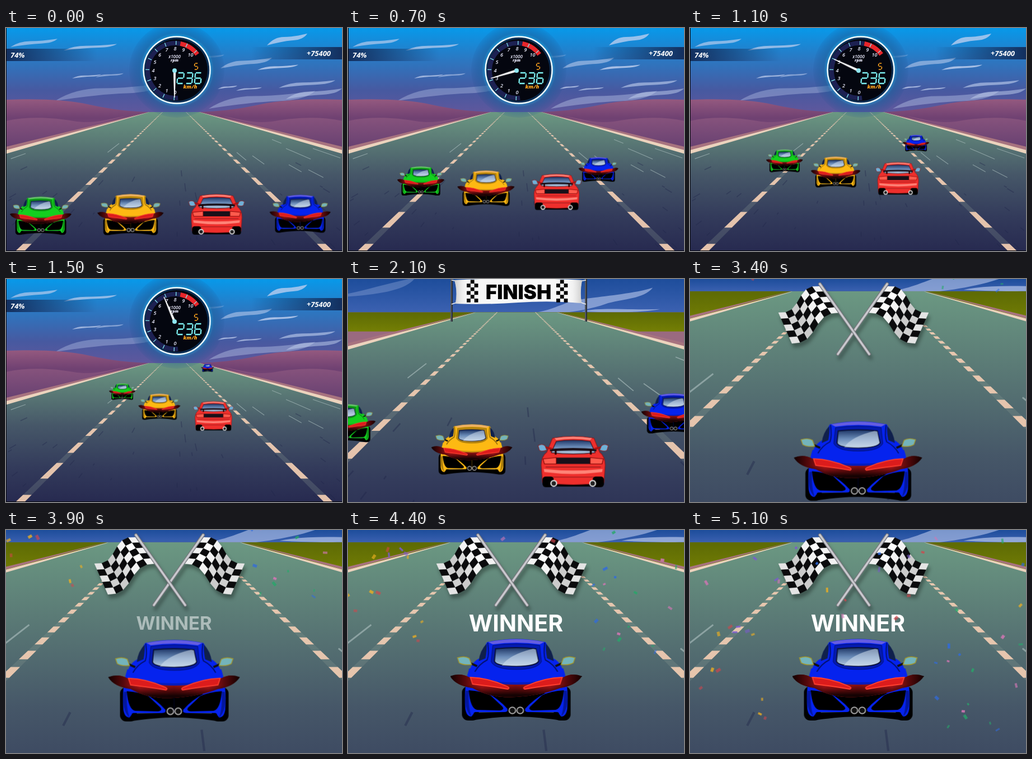
Recreate the animation shown at these times as an HTML page. Size 600x398 px, loop 5.2 s.

```html
<!DOCTYPE html>
<html lang="en">
<head>
<meta charset="utf-8">
<title>Car race</title>
<style>
html, body { margin: 0; width: 100%; height: 100%; overflow: hidden; background: #000; }
svg { display: block; width: 600px; height: 398px; }
.scene, .car, .needle, .bit, .winner, .champ { animation: 5.2s linear infinite; }
.scene { animation-timing-function: step-end; }
#race { animation-name: first; }
#finish { animation-name: second; }
#podium { animation-name: third; }
#race .car { animation-name: race; }
#finish .car { animation-name: sprint; }
.champ { animation-name: arrive; }
.needle { animation-name: rev; }
.bit { animation-name: fall; }
.winner { animation-name: pop; transform-origin: 300px 167px; }
.hud { font: italic 700 13px "Open Sans", sans-serif; fill: #fff; }
.dial { font: italic 600 9px "Open Sans", sans-serif; fill: #eef; text-anchor: middle; }
.green { --c: #13cf1f; } .yellow { --c: #fdb913; } .blue { --c: #0523ee; }

@keyframes first { 0% { visibility: visible } 34.615%, 100% { visibility: hidden } }
@keyframes second { 0% { visibility: hidden } 34.615% { visibility: visible } 59.615%, 100% { visibility: hidden } }
@keyframes third { 0% { visibility: hidden } 59.615%, 100% { visibility: visible } }
@keyframes race {
  0% { transform: var(--p0) } 13.462% { transform: var(--p1) }
  28.846% { transform: var(--p2) } 34.615%, 100% { transform: var(--p3) }
}
@keyframes sprint {
  0%, 34.615% { transform: var(--p0) } 51.923% { transform: var(--p1) } 59.615%, 100% { transform: var(--p2) }
}
@keyframes arrive {
  0%, 59.615% { transform: translate(300.5px, 432px) scale(.925); animation-timing-function: cubic-bezier(.3333, 1, .6667, 1) }
  79.2%, 100% { transform: translate(300.5px, 267px) }
}
@keyframes rev { 0% { transform: rotate(0deg) } 34.615%, 100% { transform: rotate(188deg) } }
@keyframes pop { 0%, 73% { opacity: 0; transform: scale(.6) } 77%, 100% { opacity: 1; transform: none } }
@keyframes fall { 0%, 62.5% { transform: var(--from) } 100% { transform: var(--to) } }
</style>
</head>
<body>
<svg viewBox="0 0 600 398">
<defs>
  <linearGradient id="sky" x2="0" y2="1">
    <stop stop-color="#0799ea"/><stop offset=".35" stop-color="#2b78c2"/>
    <stop offset=".7" stop-color="#4759a0"/><stop offset="1" stop-color="#65579c"/>
  </linearGradient>
  <linearGradient id="lowSky" x2="0" y2="1"><stop stop-color="#1d4d9b"/><stop offset="1" stop-color="#3d62b2"/></linearGradient>
  <linearGradient id="hill" x2="0" y2="1">
    <stop stop-color="#94597f"/><stop offset=".35" stop-color="#6f4172"/><stop offset="1" stop-color="#8a5480"/>
  </linearGradient>
  <linearGradient id="ridge" x2="0" y2="1"><stop stop-color="#935c82"/><stop offset="1" stop-color="#58386b"/></linearGradient>
  <linearGradient id="grass" x2="0" y2="1"><stop stop-color="#5d6a04"/><stop offset="1" stop-color="#747f05"/></linearGradient>
  <linearGradient id="tarmac" x2="0" y2="1">
    <stop stop-color="#6b9882"/><stop offset=".2" stop-color="#5b7b76"/><stop offset=".45" stop-color="#465768"/>
    <stop offset=".75" stop-color="#333b5b"/><stop offset="1" stop-color="#272a50"/>
  </linearGradient>
  <linearGradient id="bar"><stop stop-color="#132f5e"/><stop offset="1" stop-color="#132f5e" stop-opacity="0"/></linearGradient>
  <radialGradient id="halo">
    <stop offset=".65" stop-color="#1fc4f4" stop-opacity=".75"/><stop offset=".78" stop-color="#1b5f9c" stop-opacity=".55"/>
    <stop offset="1" stop-color="#1b4f90" stop-opacity=".1"/>
  </radialGradient>
  <linearGradient id="wing">
    <stop stop-color="#120000"/><stop offset=".12" stop-color="#5a0a0c"/><stop offset=".24" stop-color="#b5161a"/>
    <stop offset=".5" stop-color="#8a1012"/>
    <stop offset=".76" stop-color="#b5161a"/><stop offset=".88" stop-color="#5a0a0c"/><stop offset="1" stop-color="#120000"/>
  </linearGradient>
  <linearGradient id="wingShade" x2="0" y2="1"><stop offset=".45" stop-opacity="0"/><stop offset=".9" stop-opacity=".85"/></linearGradient>
  <linearGradient id="glass" x2="0" y2="1">
    <stop stop-color="#1d3565"/><stop offset=".5" stop-color="#6a8bb8"/><stop offset="1" stop-color="#b5cade"/>
  </linearGradient>
  <linearGradient id="cloth">
    <stop stop-color="#aaa" stop-opacity=".6"/><stop offset=".12" stop-color="#fff" stop-opacity="0"/>
    <stop offset=".88" stop-color="#fff" stop-opacity="0"/><stop offset="1" stop-color="#aaa" stop-opacity=".6"/>
  </linearGradient>

  <g id="hillSide">
    <path fill="url(#hill)" d="M0 128C60 126 110 128 150 137S225 149 258 150L0 222Z"/>
    <path fill="url(#ridge)" d="M0 166C40 157 85 160 120 166S175 164 215 157L0 216Z" opacity=".7"/>
  </g>
  <g id="far">
    <g id="clouds" fill="#c4d2f0"/>
    <use href="#hillSide"/><use href="#hillSide" transform="translate(601) scale(-1 1)"/>
  </g>
  <g id="field">
    <g fill="#aebfe6">
      <path opacity=".65" d="M319 150.500C340 148 348 141 366 137S425 131 450 123C440 136 412 136 398 141S366 149 352 150.500Z"/>
      <path opacity=".75" d="M372 149C395 144 425 148 458 146.500C440 150 410 151 372 149Z"/>
      <path opacity=".3" d="M90 134C125 130 150 120 190 112C180 126 150 132 90 134Z"/>
    </g>
    <rect y="150" width="600" height="80" fill="#9a6a80"/>
    <rect y="150" width="600" height="21" fill="url(#grass)"/>
  </g>
  <g id="verge">
    <path fill="#a7737f" d="M256 149.500L0 212V219Z"/>
    <path fill="#ecd3bd" d="M256 150L0 218V224.500L254 150.800Z"/>
  </g>
  <g id="road">
    <path fill="url(#tarmac)" d="M255 150H346L600 222V398H0V222Z"/>
    <use href="#verge"/><use href="#verge" transform="translate(601) scale(-1 1)"/>
    <path id="strip" fill="#8d9c93" opacity=".25"/>
    <path id="lanes" fill="#f0ccb2" opacity=".93"/>
    <path id="skids" stroke="#20264a" stroke-width="1.600" opacity=".4"/>
    <path id="streaks" stroke="#a9bcbc" stroke-width="1.100" opacity=".65"/>
  </g>

  <g id="carSide">
    <rect x="-97" y="12" width="30" height="61" rx="11"/>
    <path fill="var(--c)" d="M0 -20H-84Q-94 10 -91 52Q-89 66 -80 66L-74 58H0Z"/>
    <path d="M-85 19Q-60 21 -46 28Q-36 38 -25 48Q-20 54 -30 55L-70 54Q-82 52 -85 19ZM0 24H-52Q-32 34 -16 52Q-14 58 -22 58L-76 59L-74 72Q-30 66 0 66Z"/>
    <path fill="#0005" d="M-90 20Q-95 52 -80 66Q-86 50 -85 20Z"/>
  </g>
  <g id="trim">
    <path d="M-53 -64Q-65 -52 -67 -33L-55 -38Q-52 -54 -53 -64Z" fill="#10204c"/>
    <path d="M-70 -24L-86 -31" stroke="#111" stroke-width="4"/>
    <path d="M-105 -39Q-92 -43 -84 -38L-80 -27Q-94 -25 -102 -30Z" fill="#74b4bb" stroke="#a0962e" stroke-width="1.500"/>
    <path d="M-82 -4Q-50 -3 -19 11Q-10 14 -15 17Q-50 11 -78 8Z" fill="#dc1c1c" stroke="#ff4030" stroke-width="1.800"/>
  </g>
  <g id="car">
    <use href="#carSide"/><use href="#carSide" transform="scale(-1 1)"/>
    <path id="wingShape" fill="url(#wing)" d="M-118 -6Q-100 -13 -84 -4H84Q100 -13 117 -6Q106 11 78 15Q45 28 0 31T-78 15Q-108 11 -118 -6Z"/>
    <use href="#wingShape" style="fill:url(#wingShade)"/>
    <path fill="url(#wingShade)" d="M-118 -6Q-100 -13 -84 -4H84Q100 -13 117 -6Q106 11 78 15Q45 28 0 31T-78 15Q-108 11 -118 -6Z"/>
    <path fill="var(--c)" d="M-52 -67Q0 -78 52 -67Q62 -52 66 -38Q85 -28 84 -5Q45 9 0 9T-84 -5Q-85 -28 -66 -38Q-62 -52 -52 -67Z"/>
    <path fill="#d9a5d0" opacity=".45" d="M-50 -67Q0 -77 50 -67L42 -63Q0 -69 -42 -63Z"/>
    <path fill="#0003" d="M-84 -5Q-45 5 0 5T84 -5Q45 9 0 9T-84 -5Z"/>
    <path fill="none" stroke="#0008" stroke-width="2" d="M-51 -66Q-48 -45 -52 -35Q-66 -28 -74 -14M51 -66Q48 -45 52 -35Q66 -28 74 -14"/>
    <path fill="#0004" stroke="#0006" d="M-42 -61Q0 -67 42 -61L45 -32Q38 -18 0 -18T-45 -32Z"/>
    <path fill="url(#glass)" stroke="#0a123c" stroke-width="2" d="M-37 -55Q0 -59 35 -55L40 -33Q36 -24 0 -24T-39 -33Z"/>
    <path fill="#dce8f4" opacity=".5" d="M-26 -25Q-12 -45 30 -55L35 -54L39 -34Q35 -25 0 -24Z"/>
    <use href="#trim"/><use href="#trim" transform="scale(-1 1)"/>
    <g fill="#111" stroke="#a9a9a9" stroke-width="2"><circle cx="-7" cy="55" r="5.800"/><circle cx="7" cy="55" r="5.800"/></g>
  </g>
  <g id="coupeSide">
    <path d="M-34 -20L-50 -24" stroke="#a11" stroke-width="3"/>
    <path d="M-56 -25Q-50 -29 -45 -25L-42 -18Q-50 -15 -54 -18Z" fill="#6fb0d8" stroke="#822"/>
    <rect x="-49" y="24" width="18" height="17" rx="5"/>
    <path fill="#ff5b4d" stroke="#700" d="M-48 -4L-27 -6V4H-46Z"/>
    <path d="M-28 -11V-19" stroke="#200" stroke-width="3"/>
  </g>
  <g id="coupe">
    <rect x="-48" y="28" width="96" height="12" rx="4"/>
    <path fill="#ee2f2c" stroke="#90171a" d="M-33 -37Q0 -43 33 -37L42 -15Q51 -8 51 6L49 34Q0 40 -49 34L-51 6Q-51 -8 -42 -15Z"/>
    <path fill="#ff8377" d="M-30 -37Q0 -42 30 -37L27 -34Q0 -38 -27 -34ZM-47 12Q0 17 47 12L46 17Q0 23 -46 17Z"/>
    <path fill="url(#glass)" stroke="#301020" d="M-27 -32Q0 -36 27 -32L35 -14Q0 -10 -35 -14Z"/>
    <path fill="#191019" d="M-37 -20Q0 -23 37 -20V-16Q0 -19 -37 -16ZM-27 -6H27V4H-27Z"/>
    <path stroke="#a41c1e" stroke-width="1.500" d="M-44 9H44M-46 25H46"/>
    <use href="#coupeSide"/><use href="#coupeSide" transform="scale(-1 1)"/>
    <g fill="#222" stroke="#ddd" stroke-width="2"><circle cx="-31" cy="35" r="4.500"/><circle cx="31" cy="35" r="4.500"/></g>
  </g>
  <g id="flag">
    <g id="checks"/>
    <path d="M232 9L320 134" stroke="#77777d" stroke-width="6" stroke-linecap="round"/>
    <path d="M232 9L320 134" stroke="#c9c9ce" stroke-width="3.500" stroke-linecap="round"/>
  </g>
</defs>

<g id="race" class="scene">
  <rect width="600" height="160" fill="url(#sky)"/>
  <use href="#far"/><use href="#road"/>
  <rect y="37" width="163" height="22" fill="url(#bar)"/>
  <rect y="-56" x="-600" width="162" height="22" fill="url(#bar)" transform="scale(-1)"/>
  <text class="hud" x="8" y="53">74%</text>
  <text class="hud" x="580" y="50" text-anchor="end">+75400</text>
  <circle cx="305" cy="75" r="85" fill="url(#halo)"/>
  <circle cx="305" cy="75" r="59.500" fill="#0a2c50" stroke="#f2fcff" stroke-width="2.500"/>
  <circle cx="305" cy="75" r="55" fill="#04060f"/>
  <g id="dial" class="dial">
    <text x="301" y="54" font-size="8">x1000</text>
    <text x="301" y="60" font-size="7" font-weight="800">rpm</text>
    <text x="329" y="108" font-size="9.500" font-weight="800" style="fill:#ffa51f">km/h</text>
  </g>
  <g transform="translate(301 76)">
    <path class="needle" fill="#fff" d="M-2.200 0L-.7 48H.7L2.200 0Z"/>
    <circle r="4" fill="#8fe6f2"/>
  </g>
  <g class="car blue" style="--p0:translate(525.500px,331.500px) scale(.464);--p1:translate(447.500px,252.500px) scale(.302);--p2:translate(360px,158.500px) scale(.098);--p3:translate(342px,150px) scale(.03)"><use href="#car"/></g>
  <g class="car green" style="--p0:translate(62px,335px) scale(.468);--p1:translate(130px,273px) scale(.357);--p2:translate(207.500px,201px) scale(.2);--p3:translate(237px,174px) scale(.14)"><use href="#car"/></g>
  <g class="car yellow" style="--p0:translate(222.500px,333px) scale(.502);--p1:translate(246.500px,286px) scale(.434);--p2:translate(274px,228px) scale(.319);--p3:translate(284px,206px) scale(.275)"><use href="#car"/></g>
  <g class="car" style="--p0:translate(376px,332.500px) scale(.89);--p1:translate(372.500px,292.500px) scale(.79);--p2:translate(370.500px,244.500px) scale(.645);--p3:translate(369.500px,226px) scale(.59)"><use href="#coupe"/></g>
  <path d="M.5 0V397.500H600" fill="none" stroke="#05060c"/>
</g>

<g id="finish" class="scene">
  <rect width="600" height="62" fill="url(#lowSky)"/>
  <g transform="translate(300.500 26) scale(1.630) translate(-300.500 -129.500)">
    <use href="#field"/><use href="#road"/>
  </g>
  <path d="M185 0V76M425 0V76" stroke="#2c3038" stroke-width="4"/>
  <path d="M184 0V76M424 0V76" stroke="#7d838c"/>
  <path d="M185 2L196 4M185 45L194 42M425 2L414 4M425 45L416 42" stroke="#eee" stroke-width="1.500"/>
  <path fill="#f7f7f7" d="M190 2Q300 -4 418 2Q414 22 417 43Q360 38 304 42T192 44Q196 22 190 2Z"/>
  <path id="columns"/>
  <path fill="url(#cloth)" d="M190 2Q300 -4 418 2Q414 22 417 43Q360 38 304 42T192 44Q196 22 190 2Z"/>
  <text x="304.500" y="35.500" text-anchor="middle" font-family="Inter, sans-serif" font-weight="900" font-size="35">FINISH</text>
  <g class="car blue" style="--p0:translate(627px,285px) scale(.58);--p1:translate(490.500px,150px) scale(.311);--p2:translate(430px,90px) scale(.19)"><use href="#car"/></g>
  <g class="car green" style="--p0:translate(-42px,293px) scale(.53);--p1:translate(67px,185px) scale(.345);--p2:translate(115px,137px) scale(.262)"><use href="#car"/></g>
  <g class="car yellow" style="--p0:translate(211px,331px) scale(.66);--p1:translate(242px,250.500px) scale(.526);--p2:translate(256px,214px) scale(.466)"><use href="#car"/></g>
  <g class="car" style="--p0:translate(404px,350px) scale(1.180);--p1:translate(398.500px,277px) scale(1);--p2:translate(396px,245px) scale(.92)"><use href="#coupe"/></g>
</g>

<g id="podium" class="scene">
  <rect width="600" height="24" fill="url(#lowSky)"/>
  <g transform="translate(300.500 -32) scale(2.630) translate(-300.500 -129.500)">
    <use href="#field"/><use href="#road"/>
  </g>
  <g style="filter:drop-shadow(3px 7px 3px #0005)">
    <use href="#flag" transform="translate(584) scale(-1 1)"/><use href="#flag"/>
  </g>
  <g class="champ blue"><use href="#car"/></g>
  <text class="winner" x="300" y="181" text-anchor="middle" font-family="Inter, sans-serif" font-weight="700" font-size="41" fill="#fff">WINNER</text>
  <g id="confetti"/>
</g>
</svg>
<script>
const $ = id => document.getElementById(id);
const add = (parent, tag, attrs, text = '') => {
  const el = document.createElementNS('http://www.w3.org/2000/svg', tag);
  for (const k in attrs) el.setAttribute(k, attrs[k]);
  el.textContent = text;
  parent.append(el);
};
let seed = 11;
const rnd = (a = 0, b = 1) => {
  seed = (seed * 16807) % 2147483647;
  return a + (b - a) * seed / 2147483647;
};

// Clouds: x, y of the low end, width, rise, opacity
[[8, 34, 84, 14, .65], [103, 40, 95, 11, .7], [118, 90, 52, 7, .7], [160, 88, 50, 7, .55],
 [88, 130, 196, 30, .35], [466, 31, 72, 20, .75], [383, 72, 92, 18, .55], [449, 75, 73, 9, .8],
 [378, 109, 35, 6, .75], [411, 112, 46, 6, .7], [487, 107, 101, 13, .6], [362, 144, 190, 30, .38],
 [500, 127, 100, 18, .5], [340, 56, 50, 8, .3]
].forEach(([x, y, w, h, o]) => add($('clouds'), 'path', { opacity: o,
  d: `M${x} ${y}q${w * .18} ${-h * .75} ${w * .42} ${-h * .75}t${w * .58} ${-h * .3}q${-w * .1} ${h * .55} ${-w * .35} ${h * .6}t${-w * .65} ${h * .45}z` }));

// Lane dashes, evenly spaced in depth, on a faint strip
const vx = 300.5, vy = 129.5;
const lane = (far, near) => [-1, 1].map(s => {
  const pt = (z, k) => `${vx + s * z * k} ${vy + z}`;
  return `M${pt(far, .996)}L${pt(far, 1.056)}L${pt(near, 1.056)}L${pt(near, .996)}Z`;
}).join('');
let lanes = '';
for (let u = .00391; u < 1 / 20.5; u += .00112) lanes += lane(1 / u, Math.min(1 / (u - .00062), 268.5));
$('lanes').setAttribute('d', lanes);
$('strip').setAttribute('d', lane(20.5, 268.5));

// Marks that point at the vanishing point
const ray = (x, y, len) => {
  const a = Math.atan2(y - vy, x - vx);
  return `M${x} ${y}l${len * Math.cos(a)} ${len * Math.sin(a)}`;
};
$('streaks').setAttribute('d', [[202, 206, 26], [35, 224, 28], [412, 222, 22], [440, 228, 26], [475, 199, 18],
  [500, 215, 48], [548, 215, 52], [505, 244, 26], [540, 253, 30]].map(m => ray(...m)).join(''));
let skids = '';
for (let i = 0; i < 34; i++) skids += ray(rnd(10, 590), rnd(240, 385), rnd(4, 15));
$('skids').setAttribute('d', skids);

// Dial; angles run clockwise from straight down
const polar = (r, deg) => {
  const a = deg * Math.PI / 180;
  return [302 - r * Math.sin(a), 76 + r * Math.cos(a)];
};
const arc = (r, a, b, color, w) => add($('dial'), 'path', { fill: 'none', stroke: color, 'stroke-width': w,
  d: `M${polar(r, a)}A${r} ${r} 0 ${+(b - a > 180)} 1 ${polar(r, b)}` });
arc(49, -6, 191, '#1d2152', 8);
arc(49, 191, 234, '#e8262b', 8);
for (let n = 0; n <= 10; n++) {
  const [x, y] = polar(39, n * 22.5);
  add($('dial'), 'text', { x, y: y + 2.5 }, n);
  add($('dial'), 'path', { stroke: '#7fe8ee', 'stroke-width': 1.3, d: `M${polar(46, n * 22.5 + 2)}L${polar(53, n * 22.5 + 2)}` });
}

// Seven segment digits
const bars = { a: [0, 0, 1, 0], b: [1, 0, 1, 1], c: [1, 1, 1, 2], d: [0, 2, 1, 2], e: [0, 1, 0, 2], f: [0, 0, 0, 1], g: [0, 1, 1, 1] };
const shapes = { 2: 'abged', 3: 'abgcd', 5: 'afgcd', 6: 'afgedc' };
const digits = (text, x, y, w, h, color, sw) => [...text].forEach((ch, i) => {
  const d = [...shapes[ch]].map(s => {
    const [p, q, r, t] = bars[s], gx = (r - p) * .8, gy = (t - q) * .8;
    return `M${p * w + gx} ${q * h + gy}L${r * w - gx} ${t * h - gy}`;
  }).join('');
  add($('dial'), 'path', { d, stroke: color, 'stroke-width': sw, transform: `translate(${x + i * w * 1.42} ${y}) skewX(-5)` });
});
digits('5', 337, 63, 6, 5.5, '#ffa51f', 1.7);
digits('236', 307, 80, 11, 9.5, '#7ceef0', 2.3);

// Banner checks
let columns = '';
for (const x of [212, 372])
  for (let r = 0; r < 6; r++)
    for (let c = 0; c < 3; c++)
      if ((r + c) % 2) columns += `M${x + c * 6.8} ${1.5 + r * 6.7}h6.800v6.700h-6.800z`;
$('columns').setAttribute('d', columns);

// Waving chequered cloth
const cloth = (u, v) => [
  231 - 73 * u + v * (35 - 11 * u) - 3 * Math.sin(u * 6.28),
  13 + 47 * u + v * (47 + 8 * u) - 8 * Math.sin(u * 6.28)
];
for (let i = 0; i < 7; i++)
  for (let j = 0; j < 5; j++) {
    const corner = (a, b) => cloth((i + a) / 7, (j + b) / 5);
    const light = 228 + 26 * Math.sin(i * .95 + .6) | 0;
    const fill = (i + j) % 2 ? '#0b0b0d' : `rgb(${light},${light},${light})`;
    add($('checks'), 'path', { fill, stroke: fill, 'stroke-width': .4,
      d: `M${corner(0, 0)}L${corner(1, 0)}L${corner(1, 1)}L${corner(0, 1)}Z` });
  }

// Confetti falls from the sides first, then everywhere
const colors = ['#2f6be0', '#f0b01f', '#27a86a', '#d8434a', '#d276b4', '#7a5bd0'];
for (let i = 0; i < 48; i++) {
  const y = rnd(-360, -6);
  const x = y > -200 ? (i % 2 ? rnd(0, 165) : rnd(435, 600)) : rnd(0, 600);
  const turn = rnd(0, 180), w = rnd(4, 9);
  add($('confetti'), 'rect', { class: 'bit', x: -w / 2, y: -2, width: w, height: rnd(3, 5.5), fill: colors[i % 6], opacity: rnd(.55, .9),
    style: `--from:translate(${x}px,${y}px) rotate(${turn}deg);--to:translate(${x + rnd(-25, 25)}px,${y + 385}px) rotate(${turn + rnd(-400, 400)}deg)` });
}
</script>
</body>
</html>
```
